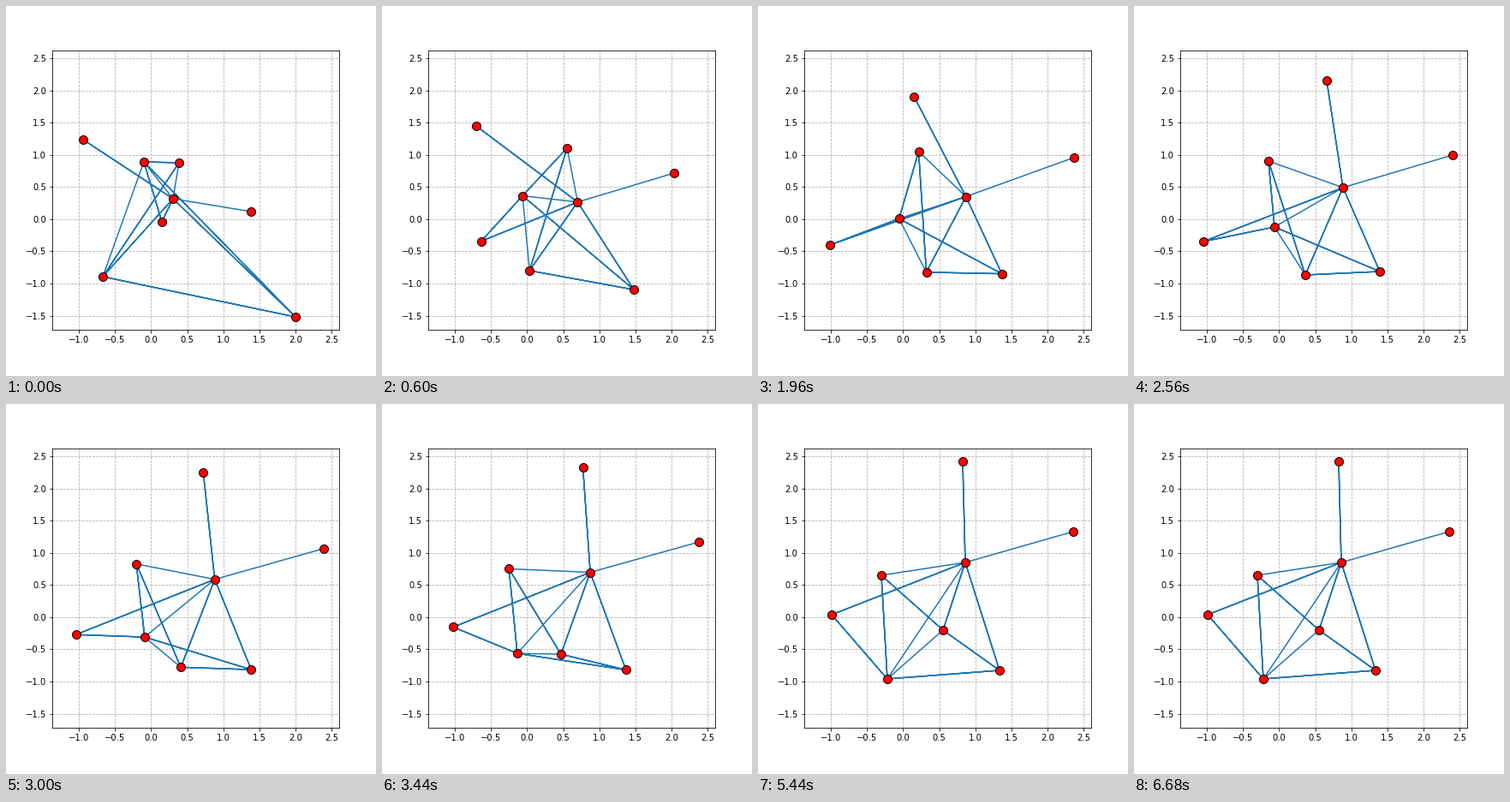
Recreate the animation shown at these times as a matplotlib script. Size 432x432 px, loop 8000 ms.

```python
import numpy as np
import matplotlib.pyplot as plt
from matplotlib.animation import FuncAnimation

SIZE, DPI = 432, 72
FRAMES, INTERVAL = 200, 40

# Stage position of the data origin, and pixels per data unit
ORIGIN = np.array([169.42, 248.86])
SCALE = np.array([84.4, -75.14])

# The layout relaxes through these poses (stage pixels), hub first
POSES = {
    0: [(195, 225), (182, 252), (161, 182), (202, 183),
        (113, 316), (338, 363), (90, 156), (286, 240)],
    32: [(239, 230), (94, 281), (165, 237), (220, 161),
         (191, 307), (282, 320), (123, 131), (359, 181)],
    64: [(244, 212), (81, 275), (164, 258), (157, 181),
         (200, 314), (287, 310), (225, 87), (372, 174)],
    112: [(242, 185), (86, 246), (151, 321), (144, 200),
          (216, 264), (282, 311), (239, 67), (368, 149)],
}
TIMES = np.array(list(POSES))
KEYS = (np.array(list(POSES.values()), float) - ORIGIN) / SCALE

# The hub links to every node; the others form a tail into a ring.
HUB, CHAIN = 0, [1, 2, 3, 4, 5, 2]
SINGLE = [(HUB, n) for n in (2, 3, 7)] + [(2, 4)]
DOUBLE = [(HUB, n) for n in (1, 4, 5, 6)] + list(zip(CHAIN, CHAIN[1:]))
# Double links are traced twice in one path, which makes them heavier
EDGES = np.array(SINGLE + 2 * DOUBLE)


def key_slopes():
    """Monotone tangents: a fast start, no overshoot, a soft stop."""
    rates = np.diff(KEYS, axis=0) / np.diff(TIMES)[:, None, None]
    before, after = rates[:-1], rates[1:]
    same_way = before * after > 0
    total = np.where(same_way, before + after, 1)
    slopes = np.zeros_like(KEYS)
    slopes[1:-1] = np.where(same_way, 2 * before * after / total, 0)
    slopes[0] = 2.5 * rates[0]
    return slopes


SLOPES = key_slopes()


def layout(frame):
    """Node positions from cubic Hermite segments between the poses."""
    frame = min(frame, TIMES[-1])
    i = min(np.searchsorted(TIMES, frame, side="right"), len(TIMES) - 1) - 1
    gap = TIMES[i + 1] - TIMES[i]
    t = (frame - TIMES[i]) / gap
    ease = t * t * (3 - 2 * t)
    bend = (1 - t) * SLOPES[i] - t * SLOPES[i + 1]
    return KEYS[i] + (KEYS[i + 1] - KEYS[i]) * ease + gap * t * (1 - t) * bend


plt.rcParams["font.family"] = "DejaVu Sans"
fig = plt.figure(figsize=(SIZE / DPI, SIZE / DPI), dpi=DPI, facecolor="white")
fig.subplots_adjust(left=0.125, right=0.9, bottom=0.125, top=0.88)
ax = fig.add_subplot()
ax.set(xlim=(-1.3675, 2.5995), ylim=(-1.7187, 2.6220))
ax.set_xticks(np.arange(-1, 2.6, 0.5))
ax.set_yticks(np.arange(-1.5, 2.6, 0.5))
ax.grid(linestyle="--", color="#b0b0b0", linewidth=0.8)

edges, = ax.plot([], [], color="C0", linewidth=1.5)
nodes, = ax.plot([], [], "o", color="red", markeredgecolor="black",
                 markersize=10, markeredgewidth=1, zorder=3)


def draw(frame):
    points = layout(frame)
    segments = np.insert(points[EDGES], 2, np.nan, axis=1)
    edges.set_data(*segments.reshape(-1, 2).T)
    nodes.set_data(*points.T)
    return edges, nodes


anim = FuncAnimation(fig, draw, frames=FRAMES, interval=INTERVAL,
                     repeat=True, repeat_delay=0)
plt.show()
```
